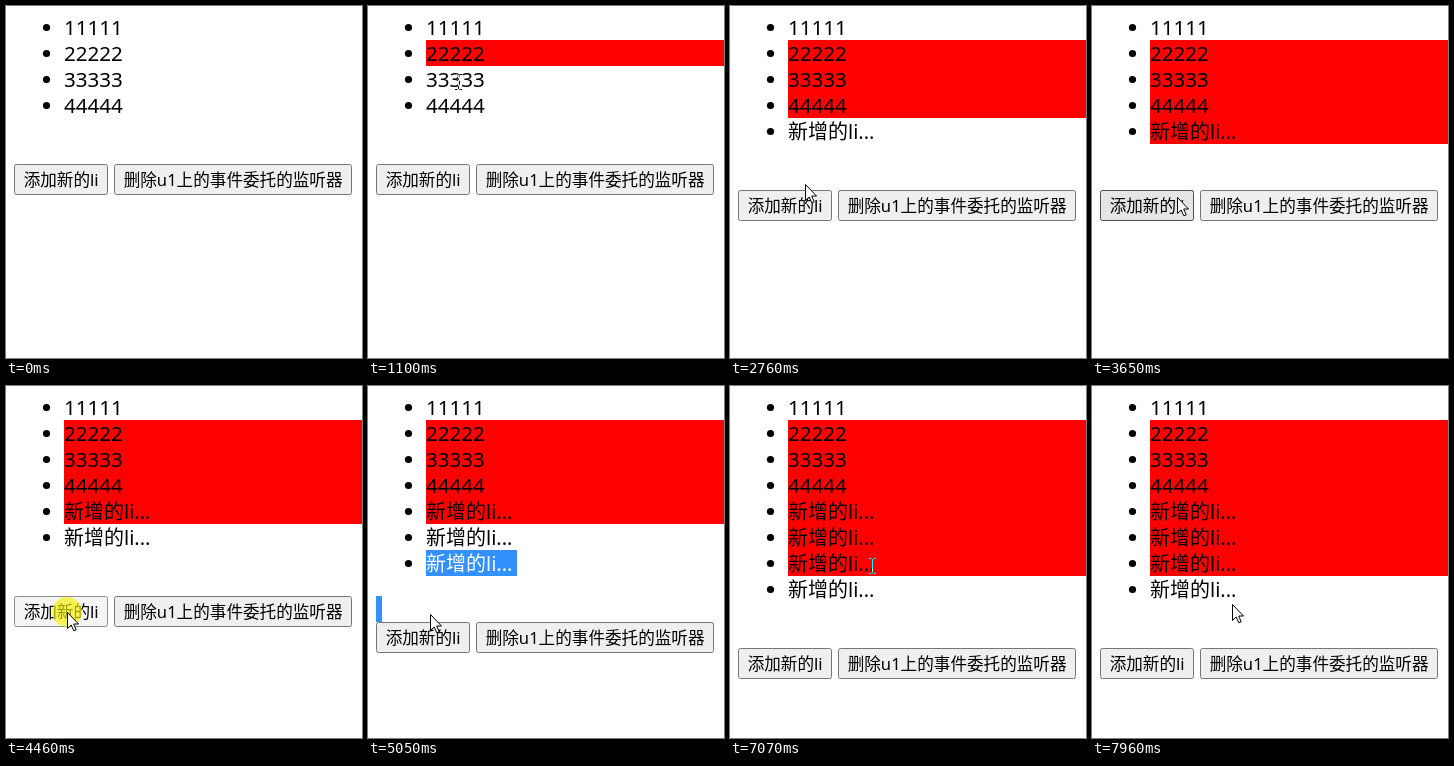
These frames come from a looping animation (356x352 px, 8000 ms). An HTML page:

```html
<!DOCTYPE html>
<html lang="zh-CN">
<head>
<meta charset="utf-8">
<style>
  html, body { margin: 0; width: 100%; height: 100%; overflow: hidden; background: #fff; }
  svg { display: block; }
  text { font-family: "Noto Sans", "Noto Sans CJK SC", "Noto Sans CJK", sans-serif; font-size: 20px; }
  .digits { font-size: 20.6px; }
  .button text { font-size: 16.6px; }
  .button rect { fill: #efefef; stroke: #767676; }
  .button.hover rect { fill: #e5e5e5; stroke: #4f4f4f; }
  .button.active rect { fill: #f5f5f5; stroke: #8d8d8d; }
  .beam { fill: none; stroke: #fff; mix-blend-mode: difference; }
</style>
</head>
<body>
<svg id="stage" width="356" height="352" viewBox="0 0 356 352"></svg>
<script>
const LOOP = 8000, STEP = 70, PHASE = 50, HOLD = 140, APPEAR = 150;
const TOP = 8, ROW = 26, LEFT = 58, BUTTON_HEIGHT = 31;
const stage = document.getElementById('stage');

// Where the pointer rests, when it arrives there, and when a click is released
const stops = [
  { at: APPEAR, x: 264, y: 279 },
  { at: 720, x: 83, y: 36, click: 970 },
  { at: 1050, x: 90, y: 76, click: 1310 },
  { at: 1560, x: 96, y: 119 },
  { at: 2070, x: 98, y: 95, click: 2210 },
  { at: 2540, x: 75, y: 178, click: 2690 },
  { at: 3040, x: 90, y: 126, click: 3340 },
  { at: 3480, x: 92, y: 137 },
  { at: 3620, x: 85, y: 191, click: 3860 },
  { at: 4180, x: 61, y: 226, click: 4600 },
  { at: 4720, x: 62, y: 228, click: 4780 },
  { at: 5180, x: 64, y: 252, click: 5460 },
  { at: 5860, x: 133, y: 176, click: 6040 },
  { at: 6300, x: 131, y: 150, click: 6640 },
  { at: 6930, x: 142, y: 180 },
  { at: 7280, x: 150, y: 272, click: 7560 },
  { at: 7960, x: 140, y: 218 }
];
const clicks = stops.filter(stop => stop.click);

function add(parent, tag, attrs = {}, content = '') {
  const node = document.createElementNS('http://www.w3.org/2000/svg', tag);
  for (const key in attrs) node.setAttribute(key, attrs[key]);
  node.textContent = content;
  return parent.appendChild(node);
}
const show = (node, on) => { node.style.display = on ? '' : 'none'; };
const move = (node, x, y) => node.setAttribute('transform', `translate(${x} ${y})`);

add(stage, 'rect', { width: 356, height: 352, fill: '#fff' });

const rows = Array.from({ length: 8 }, (_, i) => {
  const node = add(stage, 'g');
  move(node, 0, TOP + ROW * i);
  const back = add(node, 'rect', { x: LEFT, height: ROW });
  add(node, 'circle', { cx: 40.5, cy: 13.5, r: 3.6 });
  const label = i < 4
    ? add(node, 'text', { x: LEFT, y: 21, class: 'digits' }, String(i + 1).repeat(5))
    : add(node, 'text', { x: LEFT, y: 21 }, '新增的li...');
  return { node, back, label };
});

const blankLine = add(stage, 'rect', { x: 8, width: 6, height: ROW, fill: '#3390ff' });

function makeButton(left, width, caption) {
  const node = add(stage, 'g', { class: 'button' });
  add(node, 'rect', { x: left + 0.5, y: 0.5, width: width - 1, height: BUTTON_HEIGHT - 1, rx: 2 });
  add(node, 'text', { x: left + 9.7, y: 22 }, caption);
  return { node, left, width };
}
const addButton = makeButton(8, 94, '添加新的li');
const removeButton = makeButton(108, 238, '删除u1上的事件委托的监听器');

const halo = add(stage, 'circle', { r: 15, fill: '#f4f000', opacity: 0.65 });
const beam = add(stage, 'path', { class: 'beam', d: 'M-3.5-7.5H-1M1-7.5H3.5M0-7V7M-3.5 7.5H-1M1 7.5H3.5' });
const arrow = add(stage, 'path', {
  d: 'M.5.5V16.5L4.2 13 6.8 18.8 9.2 17.8 6.7 12H11.5Z', fill: '#fff', stroke: '#000'
});

const listEnd = count => TOP + ROW * count;
const buttonTop = count => listEnd(count) + 46;

function isOver({ left, width }, { x, y }, count) {
  const top = buttonTop(count);
  return x >= left && x < left + width && y >= top && y < top + BUTTON_HEIGHT;
}

// Replays every click up to time t
function pageAt(t) {
  const page = { count: 4, red: new Set(), selected: false, pressed: false };
  for (const stop of clicks) {
    if (t < stop.click - HOLD) break;
    page.selected = false;
    page.pressed = t < stop.click;
    if (page.pressed) break;
    if (stop.y < listEnd(page.count)) page.red.add(Math.floor((stop.y - TOP) / ROW));
    else if (isOver(addButton, stop, page.count)) page.count++;
    else page.selected = !isOver(removeButton, stop, page.count);
  }
  return page;
}

function pointerAt(t) {
  const time = Math.floor((t - PHASE) / STEP) * STEP + PHASE;
  const next = stops.findIndex(stop => stop.at > time);
  if (next < 1) return stops.at(next);
  const from = stops[next - 1], to = stops[next];
  const duration = 60 + 1.5 * Math.hypot(to.x - from.x, to.y - from.y);
  const depart = Math.max(from.click || from.at, to.at - duration);
  const k = Math.max(0, (time - depart) / (to.at - depart));
  const ease = k * k * (3 - 2 * k);
  return {
    x: Math.round(from.x + (to.x - from.x) * ease),
    y: Math.round(from.y + (to.y - from.y) * ease)
  };
}

function render(t) {
  const { count, red, selected, pressed } = pageAt(t);
  const visible = t >= APPEAR;
  const pointer = visible ? pointerAt(t) : { x: -99, y: -99 };
  const { x, y } = pointer;

  rows.forEach(({ node, back, label }, i) => {
    const marked = selected && i === count - 1;
    show(node, i < count);
    show(back, marked || red.has(i));
    back.setAttribute('width', marked ? 91 : 298);
    back.setAttribute('fill', marked ? '#3390ff' : '#f00');
    label.setAttribute('fill', marked ? '#fff' : '#000');
  });
  show(blankLine, selected);
  blankLine.setAttribute('y', listEnd(count) + 20);

  for (const button of [addButton, removeButton]) {
    const state = isOver(button, pointer, count) ? (pressed ? ' active' : ' hover') : '';
    button.node.setAttribute('class', 'button' + state);
    move(button.node, 0, buttonTop(count));
  }

  const textEnd = y < listEnd(4) ? 118 : 146;
  const overText = y < listEnd(count) && x >= LEFT && x < textEnd;
  show(halo, visible && pressed);
  show(beam, visible && overText);
  show(arrow, visible && !overText);
  move(halo, overText ? x - 2 : x, y);
  move(beam, x + 0.5, y);
  move(arrow, x, y);
}

const begin = performance.now();
function tick() {
  render((performance.now() - begin) % LOOP);
  requestAnimationFrame(tick);
}
tick();
</script>
</body>
</html>
```
